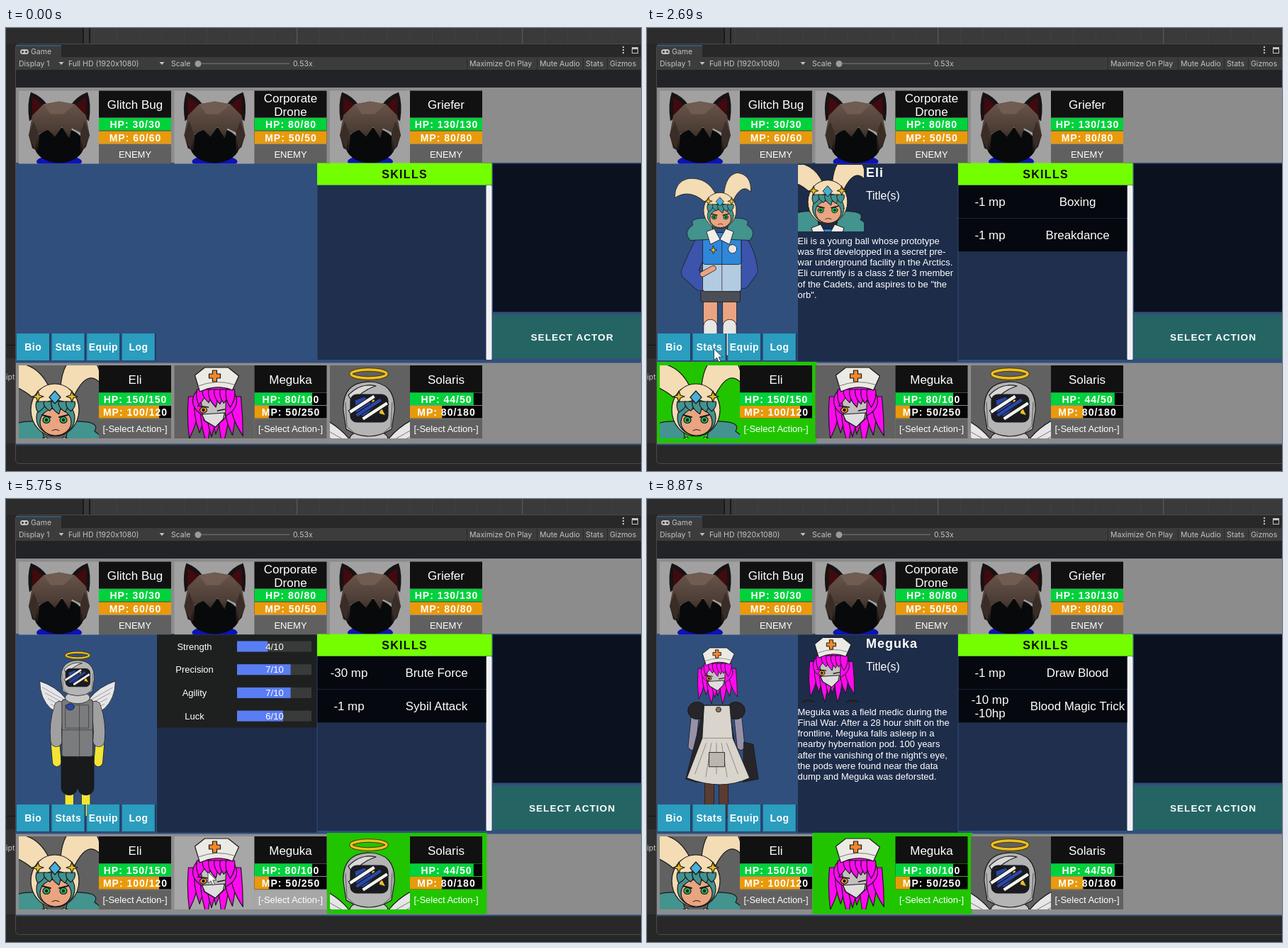
Recreate the animation shown at these times as an HTML page. Size 896 by 625 pixels, loop 9000 ms.

```html
<!DOCTYPE html>
<html lang="en">
<head>
<meta charset="utf-8">
<style>
html, body { margin: 0; width: 100%; height: 100%; overflow: hidden; background: #282828; }
svg { display: block; width: 100%; height: 100%; }
text { font-family: "Liberation Sans", Arial, sans-serif; white-space: pre; }
.editor text { font-family: Inter, Roboto, sans-serif; }
.art { stroke: #191919; stroke-width: 1.2; stroke-linejoin: round; stroke-linecap: round; }
</style>
</head>
<body>
<svg id="stage" viewBox="0 0 896 625"></svg>
<script>
const LOOP = 9000;
const range = n => [...Array(n).keys()];
const rect = (x, y, w, h, fill, extra = '') =>
  `<rect x="${x}" y="${y}" width="${w}" height="${h}" fill="${fill}" ${extra}/>`;
const path = (fill, d, extra = '') => `<path fill="${fill}" d="${d}" ${extra}/>`;
const line = (color, d, width = 1) => path('none', d, `stroke="${color}" stroke-width="${width}"`);
const oval = (fill, x, y, rx, ry = rx, extra = '') =>
  `<ellipse cx="${x}" cy="${y}" rx="${rx}" ry="${ry}" fill="${fill}" ${extra}/>`;
const place = (x, y, scale, art) => `<g transform="translate(${x} ${y}) scale(${scale})">${art}</g>`;
// y is the visual middle of the capitals
const text = (x, y, s, size, { fill = '#fff', anchor = 'middle', bold = 0, gap = 0 } = {}) =>
  `<text x="${x + (anchor === 'middle' ? gap / 2 : 0)}" y="${y + size * 0.36}" font-size="${size}" fill="${fill}"
    text-anchor="${anchor}" font-weight="${bold ? 700 : 400}" letter-spacing="${gap}">${s}</text>`;
const left = { anchor: 'start' };
const lines = (x, y, s, size, step) => s.split('\n').map((row, k, all) =>
  text(x, y + step * (k - (all.length - 1) / 2), row, size)).join('');

// Characters are drawn around the middle of the head; portraits are crops of the same drawing.
const mirror = shape => shape + `<g transform="scale(-1 1)">${shape}</g>`;
const limb = (color, width, d) => line('#191919', d, width + 2) + line(color, d, width);
const star = (x, y) => path('#ecc021', `M${x} ${y - 8}l2 6 6 2-6 2-2 6-2-6-6-2 6-2z`);
const locks = (color, count, x0, x1, y, length, width) => range(count).map(k => {
  const x = x0 + (x1 - x0) * k / (count - 1), tip = x * 1.2 + 5 * Math.sin(k * 7.3);
  const end = y + length * (0.9 + 0.15 * Math.sin(k * 4.1));
  return path(color, `M${x - width} ${y}Q${x - width * 1.4} ${(y + end) / 2} ${tip} ${end}Q${x + width * 1.4} ${(y + end) / 2} ${x + width} ${y}z`);
}).join('');
const ring = (x, y, rx, ry, width) =>
  [['#4b3a08', width + 2], ['#ecc021', width]].map(([c, w]) => oval('none', x, y, rx, ry, `stroke="${c}" stroke-width="${w}"`)).join('');

function drawEli() {
  const cream = '#f4dcb4', teal = '#43938f', skin = '#eaa481', navy = '#3d54ac';
  const body = mirror(limb(skin, 28, 'M20 190V234') + limb('#e6e6e4', 27, 'M20 242V290')) +
    rect(-40, 160, 82, 32, '#4b4d57', 'rx="4"') +
    limb(navy, 32, 'M-34 66Q-50 96 -64 130L-40 152') + limb(navy, 32, 'M40 66Q58 92 62 126L46 148') +
    rect(-36, 48, 80, 122, '#b3cbe1', 'rx="6"') + rect(-36, 48, 80, 66, '#2f87da', 'rx="6"') +
    line('#191919', 'M4 60V168') + star(-14, 84) + oval('#e8e6e0', 26, 82, 9) + limb(skin, 10, 'M-36 134L-14 122');
  const hair = mirror(path(teal, 'M20 18Q66 16 56 32 78 46 62 64L12 62z')) + mirror(path('#f1eee6', 'M0 62L12 40 28 46 20 72z'));
  const head = path(cream, 'M-8 -30Q-26 -68 -66 -64 -94 -58 -94 -24 -64 -44 -32 -16z') +
    path(cream, 'M8 -32Q12 -72 36 -76 66 -72 64 -36 46 -56 28 -20z') +
    oval(cream, 0, 2, 34, 37) + oval(teal, 1, 13, 27, 25) + oval(skin, 1, 19, 22, 19) +
    locks(teal, 5, -20, 22, -10, 17, 6) +
    mirror(oval('#20c060', 12, 16, 5, 4.5) + oval('#063f25', 12, 16, 1.6) + line('#191919', 'M6 12L18 9', 2) + star(24, -17)) +
    line('#191919', 'M-4 31Q1 28 6 31') + path('#47afd8', 'M0 -25l8 9-8 9-8-9z');
  return body + hair + head;
}

function drawMeguka() {
  const pink = '#ff0af0', black = '#262529', white = '#d9d4cc';
  const body = mirror(limb('#5a3c31', 17, 'M14 196V270') + limb('#9691a9', 14, 'M42 78L48 136')) +
    path(black, 'M54 128L72 132 82 200 52 206z') + path(black, 'M-24 56L-60 200 -40 206 48 206 24 56z') +
    mirror(oval(black, 38, 66, 18, 17)) + path(white, 'M-24 56H26L32 120 65 198Q10 224 -58 198L-28 120z') +
    line('#77716b', 'M-26 120H30') + range(5).map(k => line('#77716b', `M${k * 10 - 20} 130L${k * 21 - 42} ${190 + 6 * (k % 2)}`)).join('') +
    rect(-14, 148, 30, 28, '#bcb6af') + oval('#8a7455', 4, 64, 5);
  const head = locks(pink, 8, -29, 31, -16, 66, 7) + oval(pink, 1, -10, 31, 24) +
    path('#c4c0c0', 'M-19 -14Q0 -26 17 -14L16 14 2 27 -14 18z') + path('#dedede', 'M-17 9L15 7 13 16 2 27 -13 18z') +
    oval('#ef982b', -15, 3, 5, 4) + oval('#27180a', -15, 3, 1.6) + line('#191919', 'M-23 -3L-8 -1M5 4L15 2', 1.6) +
    locks(pink, 6, -18, 23, -26, 24, 6) +
    path('#eceae4', 'M-27 -46L-13 -57 20 -57 35 -45 26 -25Q4 -34 -20 -23z') + line('#777', 'M-22 -31Q4 -41 28 -33') +
    path('#f0872a', 'M-2 -53h6v5h5v6h-5v5h-6v-5h-5v-6h5z');
  return body + head;
}

function drawSolaris() {
  const yellow = '#f3e534', gray = '#7b7c7d';
  const feathers = range(4).map(k => line('#777', `M${76 - 6 * k} ${20 + 12 * k}L30 ${46 + 8 * k}`)).join('');
  const body = mirror(path('#e6e6e8', 'M26 44Q46 18 82 6 82 44 58 66 44 76 26 68z') + feathers +
      limb(yellow, 18, 'M18 246V290M48 146L45 182') + limb('#191a1c', 34, 'M18 176V236') + limb('#a0a0a0', 24, 'M38 62Q50 98 46 136')) +
    rect(-34, 46, 67, 124, gray, 'rx="5"') + line('#303030', 'M-26 58H24V108H-26zM4 58V168M-34 112H33') + oval('#2946aa', -16, 62, 9, 7);
  const bands = range(3).map(k => rect(-25 + 5 * k, 9 * k - 14, 42, 5.5, k === 1 ? '#2946aa' : '#f3f3ee')).join('');
  const head = oval('#c9c9c9', 0, 42, 27, 13) + path('#b4b4b4', 'M-36 2Q-38 -38 0 -39 38 -38 36 2L32 28Q0 48 -32 28z') +
    path('#d9d9d9', 'M-29 -20Q-12 -38 10 -33 -14 -25 -22 -8z') + rect(-26, -21, 53, 39, '#1a1b22', 'rx="9"') +
    path('#2946aa', 'M-20 -13L-6 -18 8 -4 -6 10 -18 8z') + path('#ecc021', 'M4 -17L12 -10 4 -7zM17 -5l7 14-10-3z') +
    `<g transform="rotate(-33)">${bands}</g>` + mirror(line('#555', 'M33 -10L31 24 20 34'));
  return body + head + ring(0, -50, 25, 6, 3.5);
}

const enemyArt = `<linearGradient id="shade" x2="0" y2="1"><stop stop-color="#6a564b"/><stop offset=".55" stop-color="#4c3d35"/>
  <stop offset="1" stop-color="#17110f"/></linearGradient><g stroke="none">` + place(57, 55, 1,
  mirror(path('#171214', 'M40 -53Q24 -47 16 -34L42 -12Q46 -36 40 -53z') + path('#400a0e', 'M38 -46Q28 -41 22 -33L38 -18z')) +
  oval('#0b13b5', 0, 45, 32, 9) + oval('#08090a', 0, 22, 35, 25) +
  path('url(#shade)', 'M-43 8L-38 -20 -22 -36 0 -40 22 -36 38 -20 43 8 38 24 30 32 30 4 18 -2 14 12 4 -4 -6 10 -16 0 -28 6 -30 30 -38 26z') +
  mirror(path('#3a2d27', 'M36 -12L43 8 34 28 30 4z')) + path('#705c50', 'M-22 -36L0 -40 22 -36 6 -22 -12 -22z')) + `</g>`;

// origin: head in the 113 px portrait; stand: x, y and scale of the full figure
const heroes = [
  { name: 'Eli', hp: [150, 150], mp: [100, 120], stats: [7, 5, 6, 7], art: drawEli(), origin: [51, 61], stand: [103, 256, .68],
    skills: [['-1 mp', 'Boxing'], ['-1 mp', 'Breakdance']],
    bio: `Eli is a young ball whose prototype
was first developped in a secret pre-
war underground facility in the Arctics.
Eli currently is a class 2 tier 3 member
of the Cadets, and aspires to be "the
orb".` },
  { name: 'Meguka', hp: [80, 100], mp: [50, 250], stats: [3, 7, 5, 4], art: drawMeguka(), origin: [56, 60], stand: [98, 251, .72],
    skills: [['-1 mp', 'Draw Blood'], ['-10 mp\n-10hp', 'Blood Magic Trick']],
    bio: `Meguka was a field medic during the
Final War. After a 28 hour shift on the
frontline, Meguka falls asleep in a
nearby hybernation pod. 100 years
after the vanishing of the night's eye,
the pods were found near the data
dump and Meguka was deforsted.` },
  { name: 'Solaris', hp: [44, 50], mp: [80, 180], stats: [4, 7, 7, 6], art: drawSolaris(), origin: [55, 62], stand: [101, 253, .65],
    skills: [['-30 mp', 'Brute Force'], ['-1 mp', 'Sybil Attack']],
    bio: `Solaris was recently spawned from a
RAVE resident's involuntary asexual
reproduction. Due a contdition caused
by birth complications, Solaris cannot
make physical contact with other
entities and must wear a protective
suit at all times. Solaris was first
discovered "dead" after their parent
took them to take the shot.
Solaris' speciality is waves and signal
manipulation.` },
];
const enemies = [
  { name: 'Glitch Bug', hp: [30, 30], mp: [60, 60] },
  { name: 'Corporate\nDrone', hp: [80, 80], mp: [50, 50] },
  { name: 'Griefer', hp: [130, 130], mp: [80, 80] },
];
const portrait = hero => place(...hero.origin, 1, hero.art);

const CARD = 219.5;
const cardX = i => 14 + CARD * i;
const bar = (x, y, label, [value, max], color) =>
  rect(x, y, 102, 17.5, '#050505') + rect(x, y, 102 * value / max, 17.5, color) +
  text(x + 51, y + 9, `${label}: ${value}/${max}`, 14, { bold: 1, gap: 1 });

function card(unit, i, y, art, status, back, shade) {
  const x = cardX(i) + 117;
  return rect(x - 113, y, 113, 103, back) +
    `<svg class="art" x="${x - 113}" y="${y}" width="113" height="103">${art}</svg>` +
    rect(x, y, 102, 38, '#111') + lines(x + 51, y + 19.5, unit.name, 17, 19) +
    bar(x, y + 38.5, 'HP', unit.hp, '#00d23c') + bar(x, y + 57, 'MP', unit.mp, '#e99a0b') +
    rect(x, y + 75.5, 102, 27.5, shade) + text(x + 51, y + 89.5, status, 13);
}

function editor() {
  const gray = '#c4c4c4';
  const label = (x, y, s) => text(x, y, s, 10.5, { anchor: 'start', fill: gray });
  const arrow = x => path(gray, `M${x - 3.5} 48h7l-3.5 4z`);
  const grid = range(24).map(k => rect(124 + k * 31.8, 0, 1, 22, k % 10 === 9 ? '#606060' : '#414141')).join('');
  const tools = [[654, 'Maximize On Play'], [753, 'Mute Audio'], [818, 'Stats'], [852, 'Gizmos']];
  return `<g class="editor">` + rect(0, 0, 896, 625, '#272727') + rect(0, 0, 108, 22, '#2c2c2c') +
    rect(108, 0, 11, 22, '#191919') + rect(110, 0, 7, 22, '#383838') + rect(119, 0, 777, 22, '#3a3a3a') + grid +
    rect(0, 447, 14, 1, '#151515') + rect(0, 466, 14, 120, '#323232') + label(0, 492, 'ipt') +
    rect(13.5, 22.5, 900, 592, '#282828', 'rx="5" stroke="#4a4a4a"') +
    rect(14, 24, 64, 18, '#3c3c3c') + rect(14, 24, 64, 1.5, '#32608f') + rect(14, 41, 882, 18, '#3c3c3c') +
    rect(20, 30, 12, 7, gray, 'rx="3.5"') + oval('#3c3c3c', 23.5, 33.5, 1.6) + oval('#3c3c3c', 28.5, 33.5, 1.6) +
    label(35, 33.5, 'Game') + label(18, 50, 'Display 1') + arrow(78) + label(88, 50, 'Full HD (1920x1080)') + arrow(220) +
    label(233, 50, 'Scale') + rect(271, 49.5, 129, 1.5, '#656565') + oval('#9b9b9b', 271, 50.5, 4.5) + label(405, 50, '0.53x') +
    tools.map(([x, s]) => rect(x - 4, 42, 1, 17, '#2a2a2a') + label(x, 50, s)).join('') +
    range(3).map(k => oval(gray, 871, 27 + 4 * k, 1.2)).join('') +
    rect(883.5, 27.5, 8, 8, 'none', `stroke="${gray}"`) + rect(883, 27, 9, 3, gray) + rect(14, 59, 882, 25, '#222326') + `</g>`;
}

const board = rect(14, 84, 882, 106, '#8c8c8c') + rect(14, 190, 882, 398.5, '#314f7d') +
  enemies.map((e, i) => card(e, i, 88.5, enemyArt, 'ENEMY', '#a1a1a1', '#606060')).join('') +
  rect(14, 472.5, 882, 114, '#8c8c8c') +
  rect(439, 190.5, 246.5, 31, '#74ff00') + text(562, 206, 'SKILLS', 16, { fill: '#0b0b0b', bold: 1, gap: 1.3 }) +
  rect(439.5, 222, 238, 246, '#1f2f4d') + rect(677.5, 222, 8, 246, '#f2f2f2', 'rx="1.5"') +
  rect(687, 191.5, 209, 209, '#0b111f') + rect(687, 404.5, 209, 62, '#246564');

const buttons = ['Bio', 'Stats', 'Equip', 'Log'].map((s, i) => {
  const x = 15 + 49.6 * i;
  return rect(x, 431, 48, 38.5, '#1f3b63') + rect(x, 431, 46, 38, '#2b9dbe') + text(x + 23, 450, s, 14, { bold: 1, gap: .5 });
}).join('');

const bioPanel = hero =>
  `<svg class="art" x="213" y="193" width="93" height="94" viewBox="0 0 113 113" preserveAspectRatio="none">${portrait(hero)}</svg>` +
  text(309, 204, hero.name, 18, { ...left, bold: 1, gap: 1 }) + text(309, 236, 'Title(s)', 15.8, left) +
  hero.bio.split('\n').map((s, k) => text(212.5, 300.5 + 15.08 * k, s, 13, left)).join('');

const statsPanel = hero => rect(213, 191.5, 225.5, 131, '#1e2020') +
  ['Strength', 'Precision', 'Agility', 'Luck'].map((s, k) => {
    const y = 208 + 32.7 * k, v = hero.stats[k];
    return text(266, y, s, 13) + rect(326, y - 7.5, 105, 15, '#393b3b') +
      rect(326, y - 7.5, 10.8 * v, 15, '#597df3') + text(379, y, `${v}/10`, 13);
  }).join('');

const skillRow = ([cost, name], k) => {
  const y = 245 + 47 * k;
  return rect(439.5, y - 23, 238, 46.3, '#05080e') + text(607.5, y, name, 16.9) + lines(484, y, cost, 16.9, 19);
};

function scene({ selected, pressed, tab, hover }) {
  const hero = heroes[selected];
  let out = '';
  if (hero) {
    out += `<svg class="art" width="213" height="470">${place(...hero.stand, hero.art)}</svg>`;
    if (tab) out += rect(213, 191.5, 225.5, 279, '#1d2c48') + (tab === 'bio' ? bioPanel : statsPanel)(hero);
    out += hero.skills.map(skillRow).join('');
  }
  out += buttons + text(798.5, 436, hero ? 'SELECT ACTION' : 'SELECT ACTOR', 13.6, { bold: 1, gap: 1 });
  const active = i => i === selected || i === pressed;
  const frames = heroes.map((h, i) => active(i) ? rect(cardX(i), 471, 225.5, 114.5, '#20c500') : '');
  return out + frames.join('') + heroes.map((h, i) => {
    const back = active(i) ? '#20c500' : i === hover ? '#a7a7a7' : '#616161';
    return card(h, i, 476, portrait(h), '[-Select Action-]', back, back);
  }).join('');
}

// card clicks: pressed at, selected at, hero
const picks = [[870, 940, 0], [3800, 3910, 1], [4330, 4530, 2], [7460, 7560, 1]];
const tabs = [[1500, 'bio'], [2760, 'stats'], [6730, 'bio']];
const clicks = [...picks, ...tabs].map(c => c[0]);
// pointer stops: arrival time, x, y
const stops = [
  [130, -14, 565], [800, 150, 540], [1480, 45, 452], [2060, 224, 484], [2740, 92, 452], [3800, 356, 553],
  [4310, 545, 553], [5300, 330, 545], [6170, 124, 459], [6590, 45, 452], [7440, 247, 525], [8670, 880, 630],
];
const TRAVEL = 600;
const last = (list, test) => list.filter(test).pop() || [];

function pointer(t) {
  const k = stops.findIndex(s => s[0] > t);
  if (k < 1) return [-50, -50];
  const [t0, x0, y0] = stops[k - 1], [t1, x1, y1] = stops[k];
  const start = Math.max(t0, t1 - TRAVEL), u = Math.max(0, (t - start) / (t1 - start)), e = u * u * (3 - 2 * u);
  return [x0 + (x1 - x0) * e, y0 + (y1 - y0) * e];
}

stage.innerHTML = editor() + board + `<g id="live"></g><g id="cursor">
  <circle id="flash" r="11" fill="#e0dc00" opacity=".65"/>
  <path d="M0 0V16L4 12.5 6.8 18.5 9.4 17.4 6.8 11.6H12Z" fill="#fff" stroke="#222" stroke-width=".8"/></g>`;
const [live, cursor, flash] = ['live', 'cursor', 'flash'].map(id => document.getElementById(id));
let shown = '';

function frame(now) {
  const t = now % LOOP, [x, y] = pointer(t);
  const state = {
    pressed: last(picks, p => t >= p[0])[2],
    selected: last(picks, p => t >= p[1])[2],
    tab: last(tabs, p => t >= p[0])[1],
    hover: y > 471 && y < 586 ? Math.floor((x - 2) / CARD) : -1,
  };
  const key = JSON.stringify(state);
  if (key !== shown) live.innerHTML = scene(state);
  shown = key;
  cursor.setAttribute('transform', `translate(${x} ${y})`);
  flash.style.display = clicks.some(c => t >= c && t < c + 140) ? '' : 'none';
  requestAnimationFrame(frame);
}
requestAnimationFrame(frame);
</script>
</body>
</html>
```
